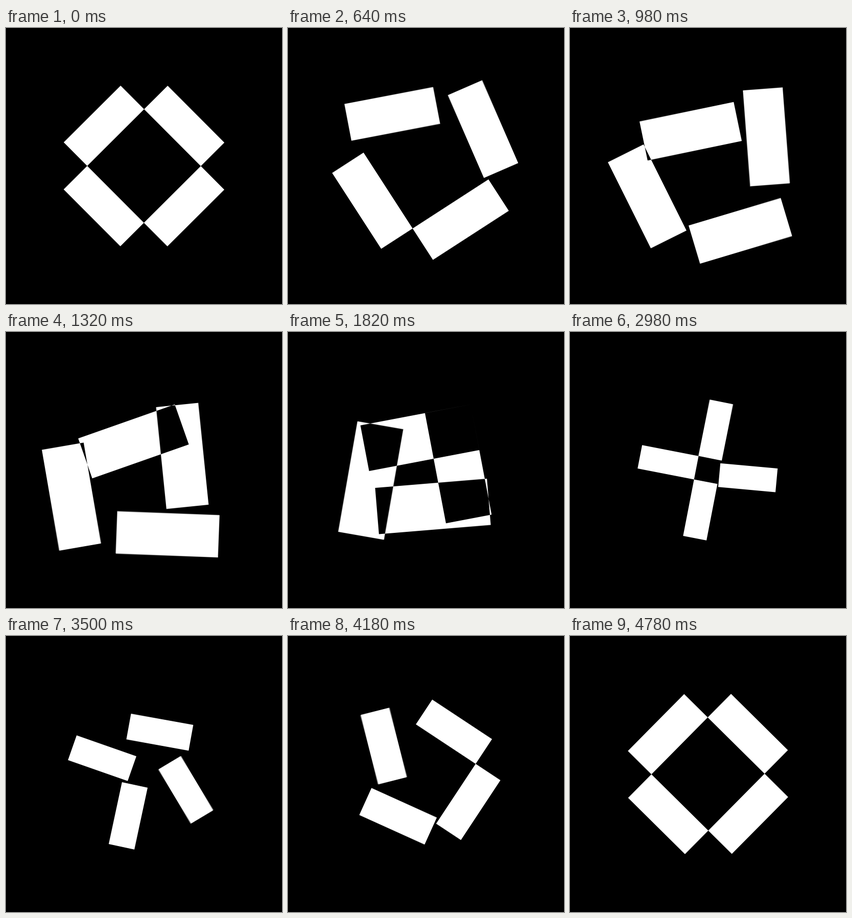
Animation of 540x540 px, one loop 4800 ms. Source, as an HTML page with a canvas:

```html
<!DOCTYPE html>
<html lang="en">
<head>
<meta charset="utf-8">
<title>Four bars</title>
<style>
  html, body { margin: 0; height: 100%; overflow: hidden; background: #000; }
  canvas { display: block; }
</style>
</head>
<body>
<canvas id="stage" width="540" height="540"></canvas>
<script>
const ctx = document.getElementById('stage').getContext('2d');

const LOOP = 4800, HALF = LOOP / 2;
const DELAY = 330, MOVE = HALF - 3 * DELAY;
const RATIO = 1 + Math.SQRT2;              // bar proportion and zoom per loop
const LENGTH = 157, WIDTH = LENGTH / RATIO;
const OUTER = LENGTH / Math.SQRT2, INNER = WIDTH / Math.SQRT2;
const SAMPLES = 5, SHUTTER = 12;           // motion blur, ms

const rad = deg => deg * Math.PI / 180;
const clamp = x => Math.min(1, Math.max(0, x));
const ease = x => x < 0.5 ? 8 * x ** 4 : 1 - 8 * (1 - x) ** 4;
const bump = x => Math.sin(Math.PI * x) ** 2;

function addBar(i, time, closing) {
  const q = clamp((time - i * DELAY) / MOVE);
  const radius = closing ? OUTER + (INNER - OUTER) * ease(q) + 20 * bump(q) : OUTER;
  const turn = closing ? 22.5 * bump(q) : 90 * ease(q) - 90 - 22.5 * bump(q);
  ctx.save();
  ctx.rotate(rad(90 * i - 135));
  ctx.translate(radius, 0);
  ctx.rotate(rad(turn));
  ctx.rect(-WIDTH / 2, -LENGTH / 2, WIDTH, LENGTH);
  ctx.restore();
}

// The large frame of bars leaves the same cross as the small bars that follow.
function drawBars(ms) {
  const t = ms % LOOP, closing = t < HALF;
  const zoom = RATIO ** (t / LOOP - (closing ? 0 : 1));
  ctx.save();
  ctx.translate(270, 270);
  ctx.rotate(rad(90 * t / LOOP));
  ctx.scale(zoom, zoom);
  ctx.beginPath();
  for (let i = 0; i < 4; i++) addBar(i, t % HALF, closing);
  ctx.fill('evenodd');
  ctx.restore();
}

function draw(now) {
  ctx.globalCompositeOperation = 'source-over';
  ctx.fillStyle = '#000';
  ctx.fillRect(0, 0, 540, 540);
  ctx.globalCompositeOperation = 'lighter';
  ctx.fillStyle = '#333';                  // five samples add up to white
  for (let k = 0; k < SAMPLES; k++) drawBars(now + k * SHUTTER / SAMPLES);
}

let start;
function tick(now) {
  start ??= now;
  draw(now - start);
  requestAnimationFrame(tick);
}
draw(0);
requestAnimationFrame(tick);
</script>
</body>
</html>
```
